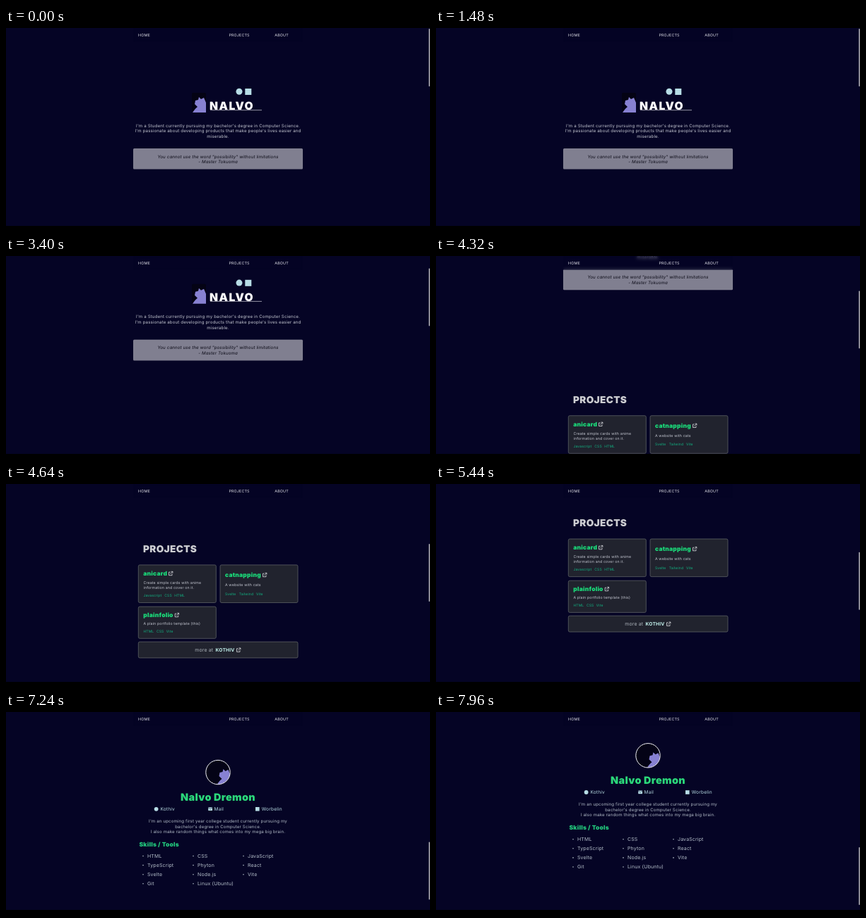
Write an HTML page that moves like this. It is 600 px wide and 284 px high and loops after 8000 ms.

```html
<!DOCTYPE html>
<html lang="en">
<head>
<meta charset="utf-8">
<title>Portfolio</title>
<style>
html, body { margin: 0; width: 100%; height: 100%; overflow: hidden; background: #050425; }
svg { position: absolute; left: 0; top: 0; width: 600px; height: 284px; }
#blur { position: absolute; left: 180px; top: 0; width: 240px; height: 20px;
  background: rgba(5, 4, 37, .32); backdrop-filter: blur(2px); }
text { font: 6.1px Inter, sans-serif; letter-spacing: .025em; fill: #c3c6d0; text-rendering: geometricPrecision; }
.mid text, text.mid { text-anchor: middle; }
.nav text { font-size: 5.4px; fill: #dfe0e6; }
.quote text { font-style: italic; fill: #0a0a16; }
text.hero { font-size: 15.6px; font-weight: 900; letter-spacing: 1.5px; fill: #fff; }
text.head { font-size: 13.6px; font-weight: 900; fill: #cdced2; }
text.title { font-size: 8.5px; font-weight: 900; fill: #1adc7a; }
text.name { font-size: 14.4px; font-weight: 900; fill: #2bd87a; }
text.skills { font-size: 8.5px; font-weight: 900; fill: #22c97c; }
text.desc { font-size: 5.25px; }
.tags text { font-size: 5px; fill: #12b382; }
text.more { font-size: 6.9px; fill: #adb4bb; }
text.strong { font-size: 6.7px; font-weight: 700; fill: #c2f1ec; }
.links text { font-size: 6.6px; fill: #b4d8df; }
.about text { fill: #b0bac5; }
#list text { font-size: 6.95px; fill: #b6c0cb; }
.card rect { fill: #21232e; stroke: #666a6c; stroke-width: .7; }
.icon { fill: #b7dde6; }
</style>
</head>
<body>
<svg viewBox="0 0 600 284">
  <defs>
    <clipPath id="round"><circle cx="17.5" cy="17.5" r="17"/></clipPath>
    <path id="figure" fill="#8781d2" d="M20 18L24 17L25 13L28 16L32 14L35 21V35H16Q20 29 23 27L19 23Z"/>
    <path id="open" fill="none" stroke="#dcdde2" stroke-width=".8" d="M2.6 1.2H.5V5.8H5V3.6M3.6.4H5.9V2.7M5.8.5L2.4 3.9"/>
  </defs>
  <g id="page">
    <circle class="icon" cx="330" cy="90.3" r="4.5"/>
    <rect class="icon" x="338.3" y="86" width="9" height="9"/>
    <rect x="263" y="92" width="20" height="28.3" rx="2" fill="#040314"/>
    <use href="#figure" x="248" y="85"/>
    <text class="hero" x="288" y="116">NALVO</text>
    <path d="M289 116.6H362" stroke="#cfd0d8" stroke-width=".7"/>
    <g class="mid">
      <text x="300" y="140.6">I'm a Student currently pursuing my bachelor's degree in Computer Science.</text>
      <text x="300" y="148.2">I'm passionate about developing products that make people's lives easier and</text>
      <text x="300" y="156">miserable.</text>
    </g>
    <rect x="180" y="171" width="240" height="29.6" rx="1.5" fill="#807f90"/>
    <g class="mid quote">
      <text x="300" y="184.6">You cannot use the word "possibility" without limitations</text>
      <text x="300" y="192">- Master Tokuoma</text>
    </g>

    <text class="head" x="194" y="361">PROJECTS</text>
    <g class="card">
      <rect x="187.3" y="379" width="110" height="53.6" rx="2"/>
      <rect x="303" y="379" width="110" height="53.6" rx="2"/>
      <rect x="187.3" y="438.2" width="110" height="45.2" rx="2"/>
      <rect x="187.3" y="488.2" width="225.7" height="22.8" rx="2"/>
    </g>
    <text class="title" x="194.3" y="394">anicard</text>
    <use href="#open" x="230" y="388"/>
    <text class="desc" x="194.5" y="405.8">Create simple cards with anime</text>
    <text class="desc" x="194.5" y="413.4">information and cover on it.</text>
    <text class="title" x="310" y="396">catnapping</text>
    <use href="#open" x="363" y="390"/>
    <text class="desc" x="310" y="409.3">A website with cats</text>
    <text class="title" x="194.3" y="453">plainfolio</text>
    <use href="#open" x="238.7" y="447"/>
    <text class="desc" x="194.5" y="464.3">A plain portfolio template (this)</text>
    <g class="tags">
      <text x="194.5" y="424">Javascript</text><text x="224.3" y="424">CSS</text><text x="238.2" y="424">HTML</text>
      <text x="310" y="421.7">Svelte</text><text x="329.7" y="421.7">Tailwind</text><text x="354" y="421.7">Vite</text>
      <text x="194.5" y="474.7">HTML</text><text x="213" y="474.7">CSS</text><text x="226.8" y="474.7">Vite</text>
    </g>
    <text class="more" x="267.3" y="502">more at</text>
    <text class="strong" x="296.6" y="502">KOTHIV</text>
    <use href="#open" x="326" y="496.6"/>

    <g transform="translate(282.5 645.3)">
      <circle cx="17.5" cy="17.5" r="17.5" fill="#040316"/>
      <use href="#figure" clip-path="url(#round)"/>
      <circle cx="17.5" cy="17.5" r="17.2" fill="none" stroke="#f2f2f6"/>
    </g>
    <text class="name mid" x="300" y="703">Nalvo Dremon</text>
    <circle class="icon" cx="212.6" cy="715" r="2.9"/>
    <path class="icon" d="M286.2 712.6H292V717.2H286.2Z"/>
    <path d="M286.2 713.2L289.1 715.2L292 713.2" fill="none" stroke="#050425" stroke-width=".5"/>
    <rect class="icon" x="353" y="712.2" width="5.6" height="5.6"/>
    <g class="links">
      <text x="218.4" y="717.3">Kothiv</text><text x="294.6" y="717.3">Mail</text><text x="361.8" y="717.3">Worbelin</text>
    </g>
    <g class="mid about">
      <text x="300" y="734">I'm an upcoming first year college student currently pursuing my</text>
      <text x="300" y="741.8">bachelor's degree in Computer Science.</text>
      <text x="300" y="749.2">I also make random things what comes into my mega big brain.</text>
    </g>
    <text class="skills" x="188.5" y="768">Skills / Tools</text>
    <g id="list"></g>
  </g>
</svg>
<div id="blur"></div>
<svg viewBox="0 0 600 284">
  <g class="nav">
    <text x="187" y="12.4">HOME</text><text x="315.4" y="12.4">PROJECTS</text><text x="380.3" y="12.4">ABOUT</text>
  </g>
  <rect y="281" width="600" height="3" fill="#000"/>
  <rect id="thumb" x="598.2" y="1" width="1.8" height="82" rx=".8" fill="#96969f"/>
</svg>
<script>
const page = document.getElementById('page');
const thumb = document.getElementById('thumb');
const LOOP = 8000;

const skills = ['HTML', 'CSS', 'JavaScript', 'TypeScript', 'Phyton', 'React',
  'Svelte', 'Node.js', 'Vite', 'Git', 'Linux (Ubuntu)'];
document.getElementById('list').innerHTML = skills.map((skill, i) => {
  const x = 200 + i % 3 * 71, y = 783.9 + Math.floor(i / 3) * 13.1;
  return `<circle cx="${x - 6}" cy="${y - 2.2}" r=".8" fill="#b6c0cb"/><text x="${x}" y="${y}">${skill}</text>`;
}).join('');

// Scroll path: [ms, offset], joined by smooth curves that rest on flat stretches.
const stops = [[0, 0], [3120, 0], [3400, 52], [3600, 86], [3840, 100], [4050, 100],
  [4320, 152], [4560, 240], [4840, 301], [5770, 301], [6280, 442], [6640, 507],
  [7040, 560], [7480, 591], [7960, 601], [LOOP, 601]];

function slope(i) {
  const before = stops[i - 1], here = stops[i], after = stops[i + 1];
  if (!before || !after || before[1] === here[1] || here[1] === after[1]) return 0;
  return (after[1] - before[1]) / (after[0] - before[0]);
}

function scrollAt(time) {
  const i = stops.findIndex(stop => stop[0] > time) - 1;
  const [t0, y0] = stops[i], [t1, y1] = stops[i + 1];
  const span = t1 - t0, u = (time - t0) / span, v = 1 - u;
  return y0 * v * v * (1 + 2 * u) + y1 * u * u * (1 + 2 * v)
    + span * u * v * (slope(i) * v - slope(i + 1) * u);
}

const start = performance.now();
function draw() {
  const offset = scrollAt((performance.now() - start) % LOOP);
  page.setAttribute('transform', `translate(0 ${-offset})`);
  thumb.setAttribute('y', 1 + offset * .318);
  requestAnimationFrame(draw);
}
draw();
</script>
</body>
</html>
```
